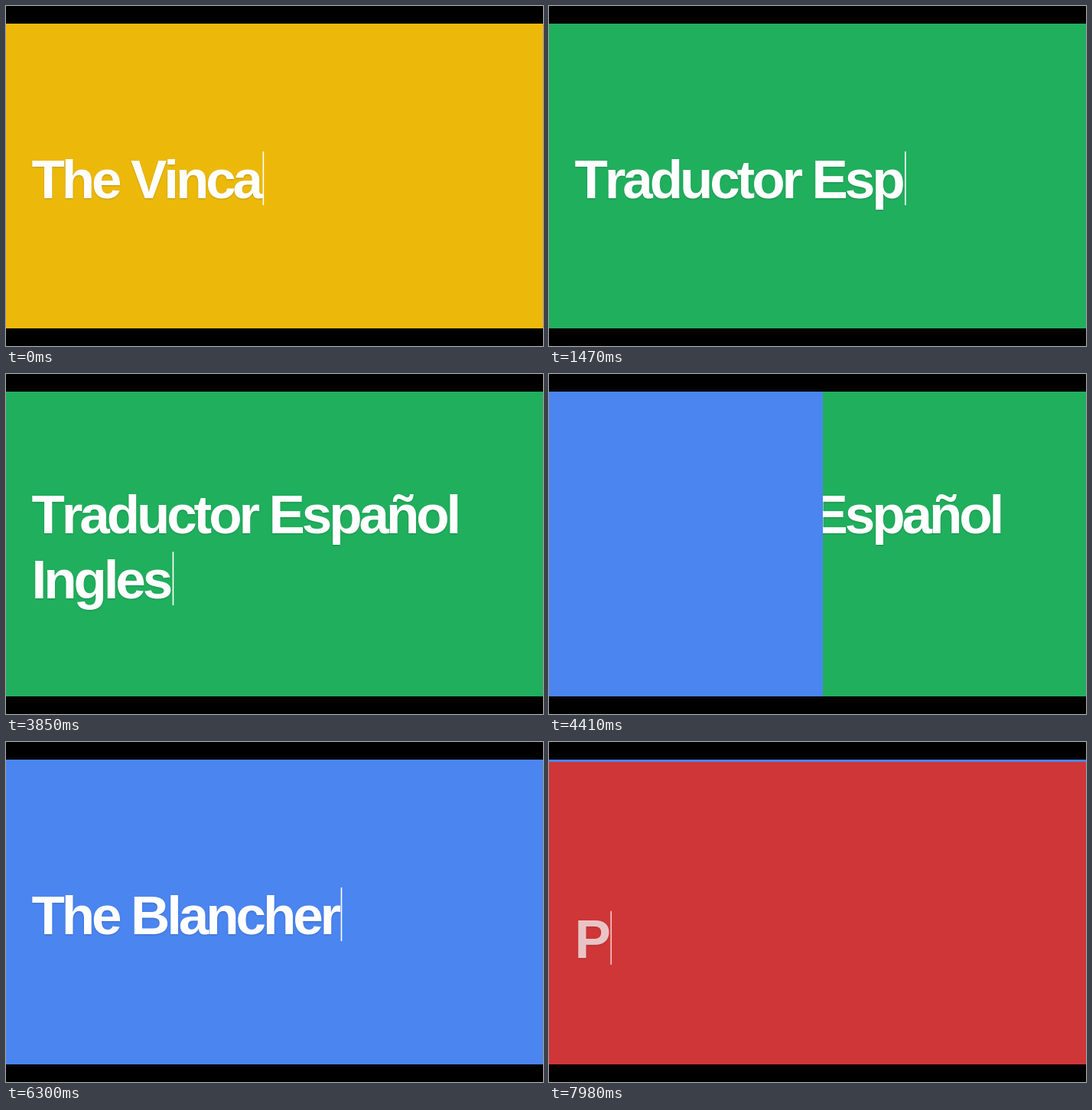
An HTML page with a canvas for the animation above (8000 ms loop, 702 by 444 pixels).

```html
<!DOCTYPE html>
<html lang="en">
<head>
<meta charset="utf-8">
<style>
  html, body { margin: 0; width: 702px; height: 444px; overflow: hidden; background: #000; }
  canvas { display: block; }
</style>
</head>
<body>
<canvas width="702" height="444"></canvas>
<script>
const ctx = document.querySelector('canvas').getContext('2d');
const LOOP = 8000, WIDTH = 702, TOP = 23, HEIGHT = 398;
const LEFT = 33.5, BASELINE = 251, LINE = 85, MAX_WIDTH = 650, CARET_GAP = 4.6;
const SLIDE = 700, SETTLE_DELAY = 250, SETTLE = 900, BLINK = 630;

// dx, dy: side the panel enters from; type: typing start; step: ms per letter
const panels = [
  { text: 'The Vinca', color: '#ecb90b', start: -3000, dx: 1, dy: 0, type: -2500, step: 90, blink: 0 },
  { text: 'Traductor Español Ingles', color: '#20af5d', start: 153, dx: 1, dy: 0, type: 476, step: 73, blink: 2310 },
  { text: 'The Blancher', color: '#4a85f0', start: 4060, dx: -1, dy: 0, type: 4450, step: 100, blink: 5670 },
  { text: 'P', color: '#cf3638', start: 7418, dx: 0, dy: 1, type: 7810, step: 100, blink: 7910 }
];

const clamp = v => Math.min(1, Math.max(0, v));
const easeInOutExpo = u => u <= 0 ? 0 : u >= 1 ? 1
  : u < .5 ? 2 ** (20 * u - 10) / 2 : 1 - 2 ** (10 - 20 * u) / 2;

ctx.font = 'bold 71px "Liberation Sans", Arial, sans-serif';
ctx.letterSpacing = '-4.1px';
ctx.fontKerning = 'none';
const widthOf = text => ctx.measureText(text).width;

function wrap(text) {
  const lines = [''];
  for (const word of text.split(/(?<= )/)) {
    const last = lines.length - 1;
    if (lines[last] && widthOf(lines[last] + word) > MAX_WIDTH) lines.push(word);
    else lines[last] += word;
  }
  return lines;
}

// Moment at which the typed text first needs a second line
for (const p of panels) {
  let n = 1;
  while (n <= p.text.length && wrap(p.text.slice(0, n)).length < 2) n++;
  p.wrapAt = n > p.text.length ? Infinity : p.type + n * p.step;
}

function drawText(p, t, x, y) {
  const count = Math.floor((t - p.type) / p.step);
  const lines = wrap(p.text.slice(0, Math.max(0, count)));
  const lift = t > p.wrapAt ? 43 * (1 - Math.exp(-.019 * (t - p.wrapAt))) : 0;
  const baseline = BASELINE + y - lift;

  ctx.fillStyle = '#fff';
  ctx.shadowColor = 'rgba(0,0,0,.2)';
  ctx.shadowOffsetY = 1;
  ctx.shadowBlur = 2;
  lines.forEach((line, i) => ctx.fillText(line, LEFT + x, baseline + i * LINE));
  ctx.shadowColor = 'transparent';

  const caretOn = t < p.blink || (t - p.blink) % BLINK < BLINK / 2;
  if (caretOn) {
    const last = lines.length - 1;
    const caretX = LEFT + x + widthOf(lines[last]) + CARET_GAP - 1;
    ctx.fillRect(caretX, baseline + last * LINE - 61, 1.6, 70);
  }
}

function drawPanel(p, t) {
  const rest = 1 - easeInOutExpo((t - p.start) / SLIDE);
  const settle = (1 - clamp((t - p.start - SETTLE_DELAY) / SETTLE)) ** 3;
  const x = Math.round(p.dx * WIDTH * rest), y = Math.round(p.dy * HEIGHT * rest);
  ctx.save();
  ctx.beginPath();
  ctx.rect(0, TOP, WIDTH, HEIGHT);
  ctx.clip();
  ctx.beginPath();
  ctx.rect(x, TOP + y, WIDTH, HEIGHT);
  ctx.clip();
  ctx.fillStyle = p.color;
  ctx.fillRect(x, TOP + y, WIDTH, HEIGHT);
  ctx.globalAlpha = 1 - settle;
  drawText(p, t, x + p.dx * 100 * settle, y + p.dy * 100 * settle);
  ctx.restore();
}

function frame() {
  const t = performance.now() % LOOP;
  ctx.fillStyle = '#000';
  ctx.fillRect(0, 0, WIDTH, 444);
  panels.filter(p => t >= p.start).slice(-2).forEach(p => drawPanel(p, t));
  requestAnimationFrame(frame);
}
frame();
</script>
</body>
</html>
```
